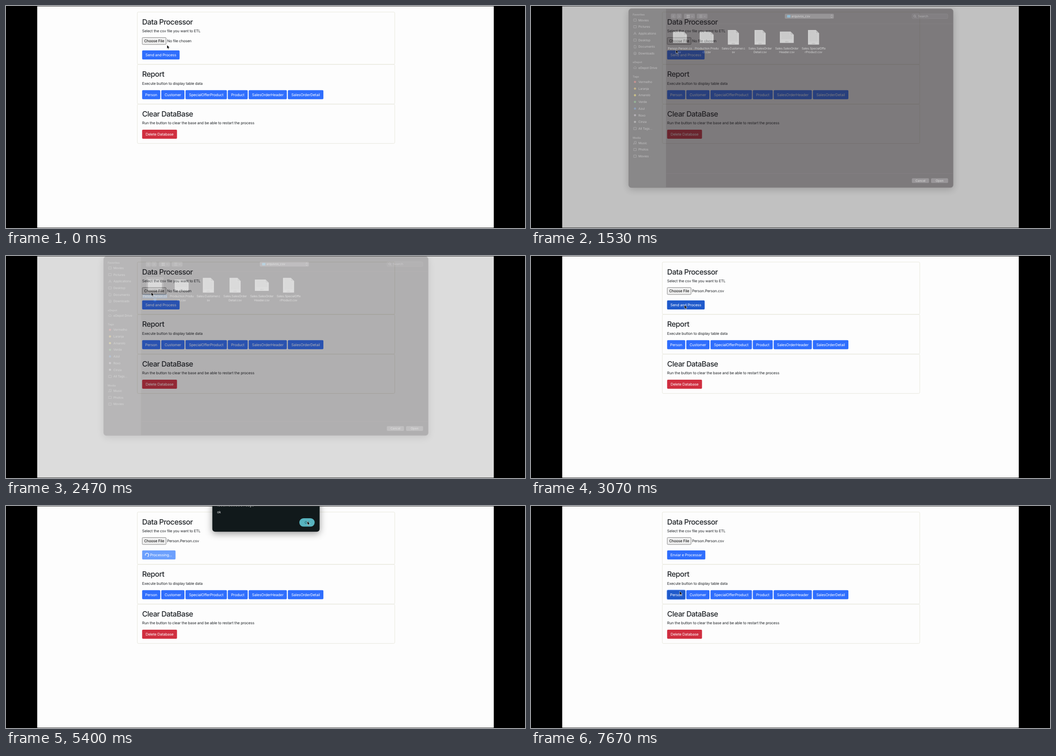
Recreate the animation shown at these times as an HTML page. Size 1143 by 490 pixels, loop 8000 ms.

```html
<!DOCTYPE html>
<html lang="en">
<head>
<meta charset="utf-8">
<title>Data Processor</title>
<style>
  html, body { margin: 0; width: 100%; height: 100%; overflow: hidden; background: #000; }
  svg { display: block; }
  text { font: 8.2px Inter, Roboto, sans-serif; letter-spacing: -.14px; fill: #212529;
    text-rendering: geometricPrecision; white-space: pre; }
  .h { font-size: 16.3px; font-weight: 500; letter-spacing: -.55px; }
  .w { fill: #fff; }
  .m { text-anchor: middle; }
  .card { fill: none; stroke: #e6e5da; stroke-width: .9; }
  .side { font-size: 6.9px; letter-spacing: -.1px; fill: #c4c2c4; }
  .sec { font-size: 6px; font-weight: 600; letter-spacing: -.05px; fill: #a19fa1; }
  .file { font-size: 6.7px; letter-spacing: -.17px; fill: #ececec; text-anchor: middle; }
  .tiny { font-size: 3.2px; letter-spacing: .3px; fill: #666; text-anchor: middle; }
  .ico { fill: none; stroke: #a9a7a9; stroke-width: .7; }
  .shade { filter: drop-shadow(0 4px 8px rgba(0, 0, 0, .4)); }
</style>
</head>
<body>
<svg id="stage" width="1143" height="490" viewBox="0 0 1143 490"></svg>
<script>
const BLUE = '#2f6efd', DARK = '#1f5acb', RED = '#d02f40';

const rect = (x, y, w, h, fill, r = 0, more = '') =>
  `<rect x="${x}" y="${y}" width="${w}" height="${h}" rx="${r}" fill="${fill}" ${more}/>`;
const text = (x, y, s, cls = '', more = '') => `<text x="${x}" y="${y}" class="${cls}" ${more}>${s}</text>`;
const path = (d, more = 'class="ico"') => `<path d="${d}" ${more}/>`;
const group = (id, body) => `<g id="${id}">${body}</g>`;
const button = (x, end, y, label, fill = BLUE) =>
  rect(x, y, end - x, 20, fill, 2) + text((x + end) / 2, y + 13.1, label, 'w m');

function page() {
  const cards = [[13.3, 115.4], [129, 87.3], [216.8, 86.6]]
    .map(([y, h]) => rect(289.2, y, 567, h, 'none', 2.5, 'class="card"')).join('');
  const reports = [
    [342, 393, 'Customer'], [395.3, 486.5, 'SpecialOfferProduct'], [488.5, 532.3, 'Product'],
    [534.5, 618.5, 'SalesOrderHeader'], [620.8, 699, 'SalesOrderDetail']
  ].map(([a, b, s]) => button(a, b, 185.8, s)).join('');
  return rect(68.5, .6, 1006, 489, '#fdfdfd', 1) + cards +
    text(299.8, 40.8, 'Data Processor', 'h') +
    text(299.8, 57.9, 'Select the csv file you want to ETL') +
    rect(300.1, 69.6, 52.4, 15.3, '#efefef', 1.3, 'id="choose" stroke="#767676" stroke-width=".9"') +
    text(326.3, 80.4, 'Choose File', 'm', 'style="fill:#000"') +
    text(354.7, 80.4, 'No file chosen', '', 'id="chosen"') +
    group('send', button(299.8, 382.3, 97.9, 'Send and Process') ) +
    group('sendHover', button(299.8, 382.3, 97.9, 'Send and Process', DARK)) +
    group('busy', rect(299.8, 97.9, 73.6, 20, '#6ca0fd', 2) +
      `<path id="spinner" d="M2.7 2.7A3.8 3.8 0 1 1 2.7 -2.7" fill="none" stroke="#fff" stroke-width="1.4"/>` +
      text(317.2, 111, 'Processing...', 'w')) +
    group('again', button(299.8, 383.9, 97.9, 'Enviar e Processar')) +
    text(299.8, 156.2, 'Report', 'h') +
    text(299.8, 174, 'Execute button to display table data') +
    rect(298.7, 184.7, 42.1, 22.2, '#9dbffc', 3, 'id="ring"') +
    button(299.8, 339.7, 185.8, 'Person') + group('personHover', button(299.8, 339.7, 185.8, 'Person', DARK)) +
    reports +
    text(299.8, 244, 'Clear DataBase', 'h') +
    text(299.8, 261.3, 'Run the button to clear the base and be able to restart the process') +
    button(299.8, 376.6, 272.9, 'Delete Database', RED);
}

// Sidebar icons, drawn around their own centre.
const shape = {
  screen: 'M-3 -2.5H3V2.5H-3Z',
  sheet: 'M-2 -3H1L2.2 -1.8V3H-2Z',
  apps: 'M-3 3L0 -3L3 3M-2 1H2',
  down: 'M-3 0A3 3 0 1 1 3 0A3 3 0 1 1 -3 0M0 -1.5V1.5M-1.2 .4L0 1.6L1.2 .4',
  cloud: 'M-2.5 2H2.4A1.6 1.6 0 0 0 2 -1A2.4 2.4 0 0 0 -2 -.8A1.5 1.5 0 0 0 -2.5 2Z',
  note: 'M-1.5 2.2V-3L2.5 -3.4V1.6M-1.5 2.2A1 1 0 1 1 -2 1.3M2.5 1.6A1 1 0 1 1 2 .8'
};

function sidebar() {
  const sections = [
    [27.5, 'Favorites', 39.5, ['Movies', 'screen'], ['Pictures', 'screen'], ['Applications', 'apps'],
      ['Desktop', 'screen'], ['Documents', 'sheet'], ['Downloads', 'down']],
    [132.5, 'eDepot', 144.5, ['eDepot Drive', 'cloud']],
    [164.3, 'Tags', 176, ['Vermelho', '#d0595c'], ['Laranja', '#cda545'], ['Amarelo', '#d2bd45'],
      ['Verde', '#62a468'], ['Azul', '#4c78b8'], ['Roxo', '#a69ba9'], ['Cinza', '#a2a0a2'], ['All Tags...', 'screen']],
    [298.8, 'Media', 310.5, ['Music', 'note'], ['Photos', 'screen'], ['Movies', 'screen']]
  ];
  return sections.map(([top, title, first, ...rows]) => text(224, top + 2.2, title, 'sec') +
    rows.map(([name, icon], i) => {
      const y = first + i * 14.7;
      const mark = shape[icon]
        ? `<g transform="translate(229 ${y})">${path(shape[icon])}</g>`
        : `<circle cx="229" cy="${y}" r="2.4" fill="${icon}"/>`;
      return mark + text(236.5, y + 2.4, name, 'side');
    }).join('')).join('');
}

function fileIcon(cx, wide) {
  const w = wide ? 15.3 : 12.2, h = wide ? 12.5 : 16.2, f = 7;
  let s = path(`M${cx - w} ${77.5 - h}H${cx + w - f}L${cx + w} ${77.5 - h + f}V${77.5 + h}H${cx - w}Z`, 'fill="#e2e2e2"') +
    path(`M${cx + w - f} ${77.5 - h}V${77.5 - h + f}H${cx + w}Z`, 'fill="#bcbcbc"');
  for (let y = 80 - h; y < 70 + h; y += 2.2)
    s += path(`M${cx - w + 3} ${y}H${cx + (y < 77.5 - h + f ? w - f - 2 : w - 3)}`, 'stroke="#b4b4b4" stroke-width=".6"');
  return s + text(cx, 76 + h, 'CSV', 'tiny');
}

function dialog() {
  const files = [
    ['Person.Person.cs', 'v', 1], ['Production.Produ', 'ct.csv', 1], ['Sales.Customer.c', 'sv', 0],
    ['Sales.SalesOrder', 'Detail.csv', 0], ['Sales.SalesOrder', 'Header.csv', 1], ['Sales.SpecialOffe', 'rProduct.csv', 0]
  ].map(([a, b, wide], i) => {
    const x = 328 + i * 58.85;
    return fileIcon(x, wide) + text(x, 104.3, a, 'file') + text(x, 112.7, b, 'file');
  }).join('');
  const grey = (x, y, w, h, fill = '#555055') => rect(x, y, w, h, fill, 2.2);
  const chevron = (x, y) => path(`M${x - 1.7} ${y - .8}l1.7 1.7l1.7 -1.7`);
  const tiles = [[343, 28], [346.6, 28], [343, 31.8], [346.6, 31.8]]
    .map(([x, y]) => rect(x, y, 2.5, 2.5, '#aaa8aa')).join('');
  return rect(215, 14.3, 715, 395, '#2e282c', 6, 'class="shade" stroke="#686468" stroke-width=".8"') +
    path('M297.3 14.7V409H221.4A6 6 0 0 1 215.4 403V20.7A6 6 0 0 1 221.4 14.7Z', 'fill="#484648"') +
    path('M297.3 47.5H929.6M297.3 378H929.6', 'stroke="#43343f" stroke-width=".8"') +
    sidebar() +
    grey(308, 25.5, 11.3, 11) + grey(320.4, 25.5, 11.3, 11) +
    path('M314.5 28.7L312.3 31L314.5 33.3M325 28.7L327.2 31L325 33.3') +
    grey(337, 25.5, 24, 11) + tiles + chevron(355, 31) +
    grey(365.2, 25.5, 23.5, 11) + path('M371 28.5H377M371 31H377M371 33.5H377') + chevron(382.5, 31) +
    grey(559, 25.7, 108, 10.6, '#686368') + rect(564, 28.4, 7.4, 5.5, '#55b4e6', 1) +
    text(573.5, 33.4, 'arquivos_csv', 'side', 'style="fill:#eee"') +
    path('M660 30l2 -2l2 2M660 32.2l2 2l2 -2', 'class="ico" style="stroke:#ddd"') +
    rect(839, 25.8, 79, 10.5, '#3a343a', 2.5, 'stroke="#575157" stroke-width=".6"') +
    '<circle cx="845" cy="30.6" r="2.2" class="ico"/>' + path('M846.7 32.3L848.6 34.2') +
    text(852.5, 33.4, 'Search', 'side', 'style="fill:#a09ca0"') +
    group('picked', rect(309, 60, 38, 35.3, '#5b565b', 2) + rect(301, 97.2, 54, 9, '#245087', 1.5) +
      rect(324.5, 105.8, 7, 8.5, '#245087', 1.5)) +
    files +
    grey(838.8, 388.6, 37.8, 10.4, '#6d686d') + grey(881, 388.6, 37.6, 10.4, '#6d686d') +
    text(857.7, 396.3, 'Cancel', 'side m', 'style="fill:#f2f2f2"') + text(899.8, 396.3, 'Open', 'side m', 'style="fill:#f2f2f2"');
}

const alertBox = () =>
  rect(454.4, -30, 236.3, 86.8, '#11191b', 6, 'class="shade"') +
  text(465, 1.1, 'localhost:3001 says', 'w', 'style="font-size:8.6px;font-weight:500;letter-spacing:0"') +
  text(465, 16, 'ok', 'w', 'style="font-size:7.2px"') +
  rect(646, 27, 33.8, 18.6, '#58b3bf', 9.3) +
  text(663, 39, 'OK', 'm', 'style="font-size:7.4px;fill:#0c4a55"');

const stage = document.getElementById('stage');
stage.innerHTML = '<clipPath id="view"><rect x="68.5" y=".6" width="1006" height="489"/></clipPath>' +
  '<g clip-path="url(#view)">' + page() + rect(68.5, .6, 1006, 489, '#000', 0, 'id="dim"') +
  group('sheet', dialog()) + group('alert', alertBox()) +
  path('M0 0V8.2L1.9 6.5L3.2 9.5L4.6 8.9L3.4 6H6Z', 'id="cursor" fill="#000" stroke="#fff" stroke-width=".6"') + '</g>';

const $ = id => document.getElementById(id);
const clamp = v => Math.max(0, Math.min(1, v));
const ramp = (t, a, b) => clamp((t - a) / (b - a));
const fade = (id, v) => $(id).setAttribute('opacity', v);
const show = (id, on) => fade(id, on ? 1 : 0);

// time, x, y of the pointer tip
const track = [
  [30, 354.5, 86], [200, 336, 81], [600, 336, 81], [1370, 319, 97.5], [1430, 319, 97.5], [2150, 320, 80],
  [2560, 320, 80], [2980, 338, 108], [3130, 338, 108], [3880, 513.5, 118], [4480, 513.5, 118],
  [5250, 663.7, 33.5], [5600, 663.7, 33.5], [6370, 322, 191], [6730, 322, 191], [6830, 324, 189],
  [7570, 324, 189], [7670, 327.3, 188]
];

function pointer(t) {
  const i = track.findIndex(k => k[0] > t);
  if (i < 1) return (i ? track[track.length - 1] : track[0]).slice(1);
  const [a, x, y] = track[i - 1], [b, u, v] = track[i];
  const p = (t - a) / (b - a), e = p * p * (3 - 2 * p);
  return [x + (u - x) * e, y + (v - y) * e];
}

function draw(t) {
  const sent = 3090, closed = 5550;
  const open = t < 2000 ? ramp(t, 1430, 1650) : 1 - ramp(t, 2254, 2542);

  $('choose').setAttribute('fill', t > 110 && t < 2560 ? '#dedede' : '#efefef');
  $('chosen').textContent = t < 2540 ? 'No file chosen' : 'Person.Person.csv';
  show('send', t < sent);
  fade('sendHover', t < sent ? ramp(t, 2830, 2980) : 0);
  show('busy', t >= sent && t < closed);
  show('again', t >= closed);
  $('spinner').setAttribute('transform', `translate(310.6 108) rotate(${t / 750 * 360 + 43})`);
  fade('personHover', ramp(t, 6250, 6400));
  fade('ring', ramp(t, 6490, 6570));

  fade('dim', .52 * open);
  fade('sheet', open);
  $('sheet').setAttribute('transform', `translate(0 ${22 * (open - .84)})`);
  show('picked', t > 2000);
  show('alert', t >= 4450 && t < closed);
  $('cursor').setAttribute('transform', `translate(${pointer(t)})`);
}

function tick() {
  draw(performance.now() % 8000);
  requestAnimationFrame(tick);
}
tick();
</script>
</body>
</html>
```
